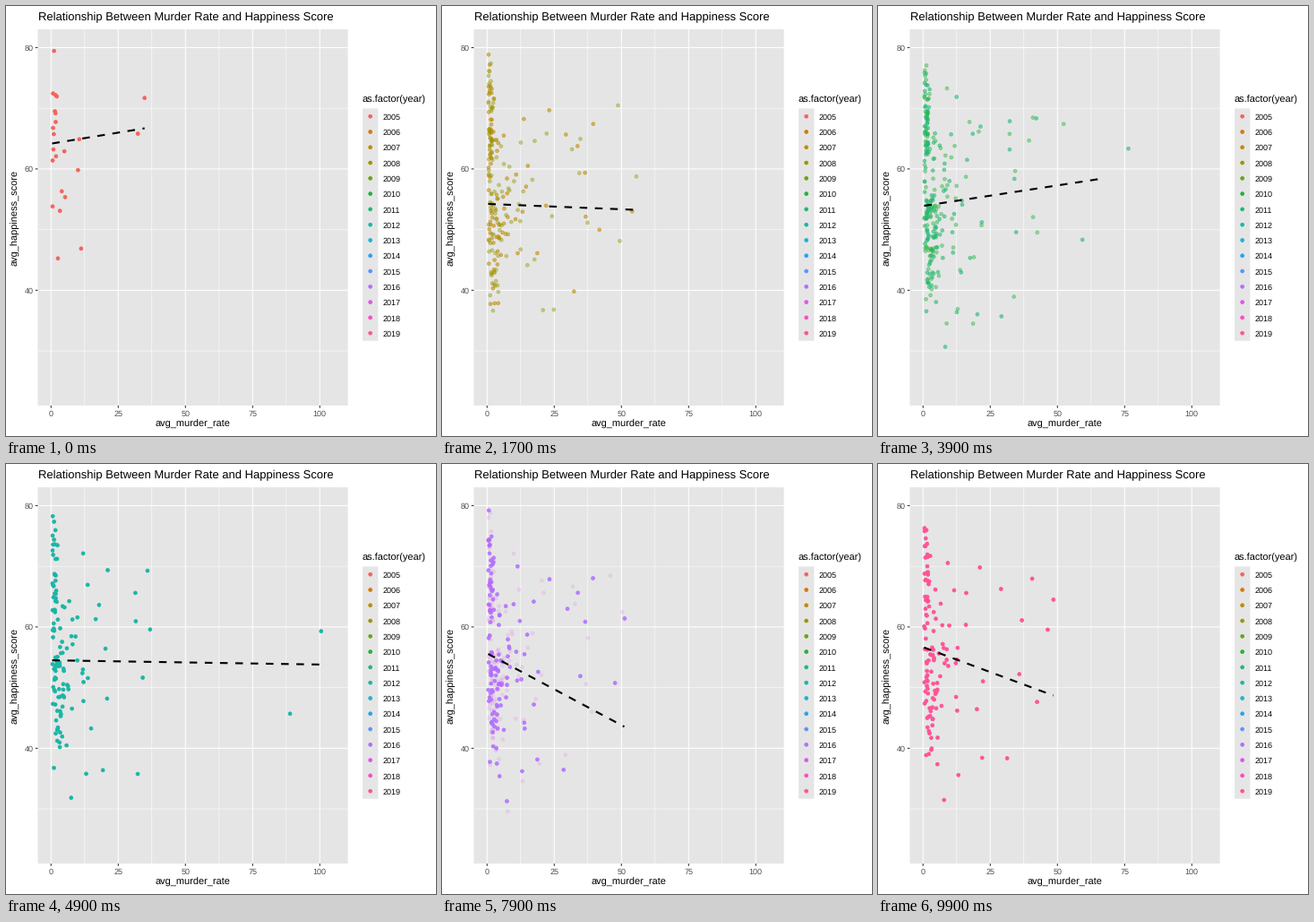
A matplotlib script for the animation above (10000 ms loop, 480 by 480 pixels).

```python
import numpy as np
import matplotlib.pyplot as plt
from matplotlib.animation import FuncAnimation
from matplotlib.patches import Rectangle

plt.rcParams.update({"font.family": "Liberation Sans", "text.hinting": "none"})

FRAMES, STEP = 100, 100
YEARS = np.arange(2005, 2020)
COLORS = ["#f5625c", "#d6780a", "#c08a00", "#959800", "#62a80f",
          "#1fb436", "#20b873", "#1bb5a6", "#20b0d5", "#22a3f3",
          "#6090ff", "#ae70ff", "#df55ec", "#fb4bc5", "#ff5396"]
PANEL = (35.5, 26, 381.6, 446)
GREY = "#e5e5e5"
CLUSTER, HAPPY = 108, 30

# Key years: trend start, trend end, highest murder rate, happiness there
KEY_YEARS = [2005, 2007, 2009, 2010, 2012, 2014, 2015, 2016, 2019]
TREND_START = [64.2, 54.4, 53.6, 53.7, 54.5, 54.1, 53.9, 55.5, 56.6]
TREND_END = [66.7, 51, 61.6, 60.2, 53.8, 51.6, 51, 43.3, 48.7]
TOP_RATE = [34.8, 54, 57.1, 52.3, 100.5, 99.5, 105.3, 51.2, 48.5]
TOP_SCORE = [71.7, 53, 64.5, 67.4, 59.3, 58.6, 60.2, 61.4, 64.5]

# Usual place of the countries outside the dense cluster
LONERS = [(32.5, 66.5), (12, 66), (34, 64), (37, 61.5), (21, 69), (17, 59.5),
          (22, 52.5), (19, 46), (31, 38), (14, 55), (41, 69), (36, 50),
          (18, 66), (14, 44), (20, 37), (11, 72), (13, 36), (8, 31)]

rng = np.random.default_rng(11)


def px(rate):
    return 50.3 + 3 * np.asarray(rate)


def py(score):
    return 46.45 + 6.772 * (80 - np.asarray(score))


# Happy, safe countries plus a broad middle group, in order of first report
middle = CLUSTER - HAPPY
base_x = .5 + np.r_[rng.gamma(1.6, .5, HAPPY),
                    np.minimum(rng.gamma(1.1, 2.9, middle), 11)]
base_y = np.r_[rng.uniform(62, 76, HAPPY),
               np.clip(rng.normal(51, 7, middle), 37, 64)]
order = np.argsort(rng.random(CLUSTER) - .25 * (np.arange(CLUSTER) < HAPPY))


def key(year, values):
    return np.interp(year, KEY_YEARS, values)


def year_points(year):
    share = np.interp(year, [2005, 2006, 2009], [.19, .62, 1])
    pick = order[:int(share * CLUSTER)]
    top = key(year, TOP_RATE)
    spots = np.array([(top, key(year, TOP_SCORE)), *LONERS[:2],
                      (.84 * top, 48), *LONERS[2:]])
    spots = spots[:int(share * len(spots))]
    x = np.r_[spots[:, 0], base_x[pick]]
    y = np.r_[spots[:, 1], base_y[pick]]
    # Everyone drifts a little, except the country on top
    x[1:] *= np.exp(rng.normal(0, .08, len(x) - 1))
    y[1:] += rng.normal(0, 1.5, len(y) - 1)
    return np.column_stack([px(x), py(y)])


def trend_line(year):
    ends = [key(year, TREND_START), key(year, TREND_END)]
    return np.array([px([.4, key(year, TOP_RATE)]), py(ends)])


points = [year_points(y) for y in YEARS]
lines = [trend_line(y) for y in YEARS]
arrivals = np.rint(1 + (FRAMES - 1) * np.arange(15) / 14).astype(int) - 1

fig = plt.figure(figsize=(480 / 72, 480 / 72), dpi=72, facecolor="white")
ax = fig.add_axes([0, 0, 1, 1])
ax.set(xlim=(0, 480), ylim=(480, 0))
ax.axis("off")


def box(x0, y0, x1, y1):
    ax.add_patch(Rectangle((x0, y0), x1 - x0, y1 - y0, fc=GREY, lw=0,
                           snap=False, zorder=0))


def stroke(x, y, color, width):
    ax.plot(x, y, color=color, lw=width, solid_capstyle="butt",
            snap=False, zorder=1)


def label(x, y, text, size, color="black", **kw):
    ax.text(x, y, text, size=size, color=color, **kw)


def dots(color="none", x=(), y=()):
    # Two widths keep markers from being rounded to whole pixels
    return ax.scatter(x, y, s=3.91 ** 2, linewidths=(.71, .71),
                      fc=color, ec=color, zorder=3)


left, top, right, bottom = PANEL
box(*PANEL)
for v in np.arange(0, 101, 12.5):
    major = v % 25 == 0
    stroke([px(v)] * 2, [top, bottom], "white", 1.07 if major else .53)
    if major:
        stroke([px(v)] * 2, [bottom, bottom + 2.75], "#333333", 1.07)
        label(px(v), 458, f"{v:.0f}", 9, "#4d4d4d", ha="center")
for v in range(30, 81, 10):
    major = v % 20 == 0
    stroke([left, right], [py(v)] * 2, "white", 1.07 if major else .53)
    if major:
        stroke([left - 2.75, left], [py(v)] * 2, "#333333", 1.07)
        label(30.5, py(v) + 3.2, str(v), 9, "#4d4d4d", ha="right")

label(35.5, 16.2, "Relationship Between Murder Rate and Happiness Score", 13)
label(208.5, 470, "avg_murder_rate", 11, ha="center")
label(10.7, 236, "avg_happiness_score", 11, rotation=90, ha="center", va="center")

label(398, 108, "as.factor(year)", 11)
box(398.1, 114.5, 415.4, 373.7)
for i, (year, color) in enumerate(zip(YEARS, COLORS)):
    y = 123.2 + 17.28 * i
    dots(color, [406.7], [y])
    label(420.5, y + 3.6, str(year), 9)

layers = [dots(), dots()]
trend, = ax.plot([], [], color="black", lw=2.13, ls=(0, (4, 4)),
                 dash_capstyle="butt", zorder=4)


def show(layer, i, alpha):
    layer.set_offsets(points[i])
    layer.set_facecolor(COLORS[i])
    layer.set_edgecolor(COLORS[i])
    layer.set_alpha(alpha)


def update(frame):
    i = min(np.searchsorted(arrivals, frame, side="right") - 1, 13)
    t = (frame - arrivals[i]) / (arrivals[i + 1] - arrivals[i])
    show(layers[0], i, 1 - t)
    show(layers[1], i + 1, t)
    trend.set_data(*(lines[i] * (1 - t) + lines[i + 1] * t))
    return [*layers, trend]


anim = FuncAnimation(fig, update, frames=FRAMES, interval=STEP,
                     repeat=True, repeat_delay=0, blit=False)
plt.show()
```
